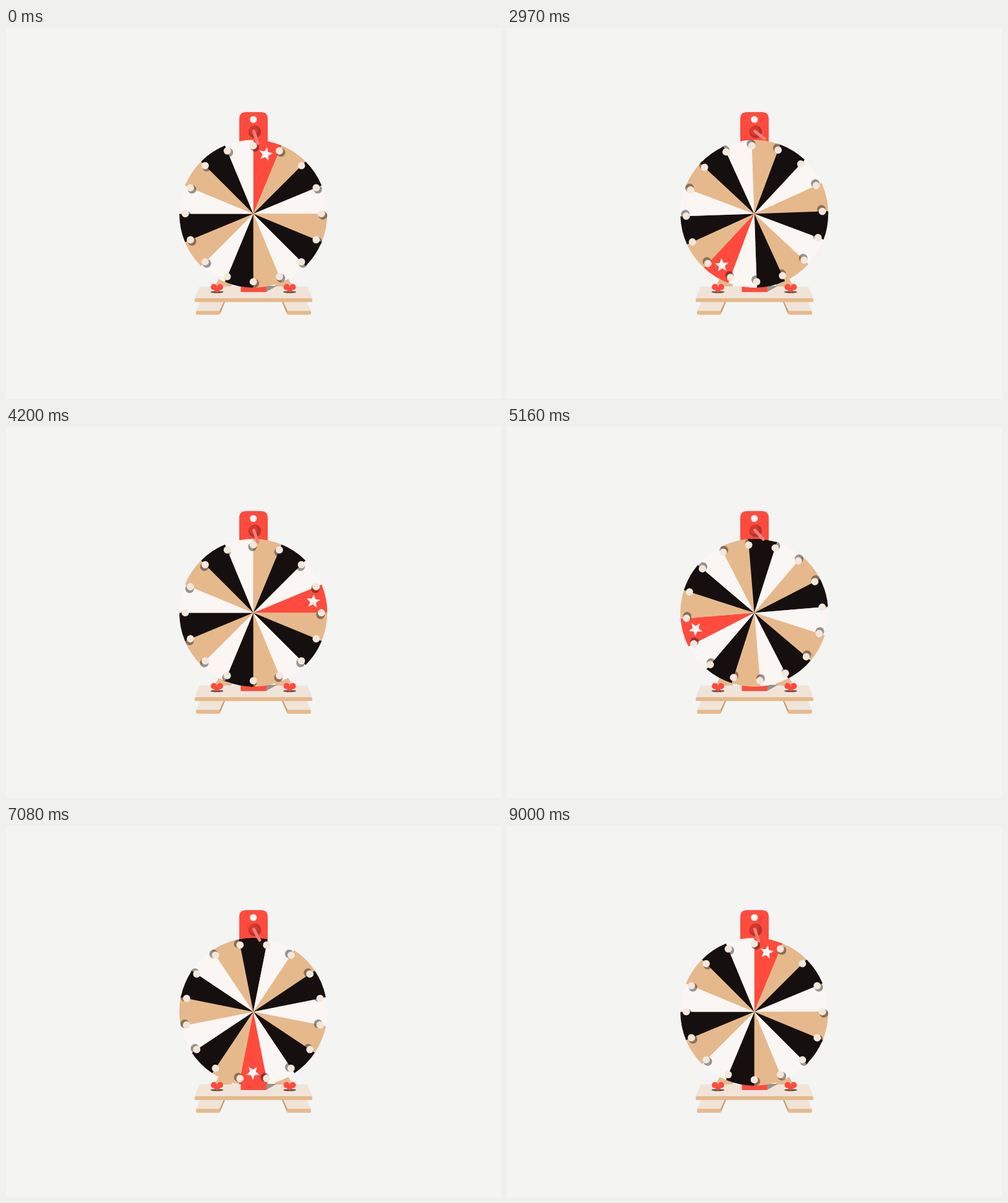
Animation, 800 px wide and 600 px high, one loop 9.6 s. Source, as an HTML page:

```html
<!DOCTYPE html>
<html lang="en">
<head>
<meta charset="utf-8">
<title>Prize wheel</title>
<style>
  html, body { margin: 0; width: 100%; height: 100%; overflow: hidden; background: #f4f4f3; }
  svg { display: block; width: 100vw; height: 100vh; }
  .red { fill: #ff4b3d; }
  .tan { fill: #e6b98c; }
  .cream { fill: #f0e4d8; }
  .edge { fill: #c99766; }
</style>
</head>
<body>
<svg viewBox="0 0 800 600">
  <defs>
    <g id="brace">
      <path class="tan" d="M337 418L348 398H375L364 418Z"/>
    </g>
    <g id="foot">
      <path class="edge" d="M354 443L346 462L344 458L349 443Z"/>
      <path class="cream" d="M314 443H352L345 458H307Z"/>
      <rect class="tan" x="307" y="457.5" width="39" height="6.3" rx="2"/>
    </g>
    <g id="nut">
      <ellipse cx="341" cy="427" rx="10.5" ry="1.7" fill="#66504a"/>
      <path class="red" d="M337 420H345V425.5Q341 428.500 337 425.500Z"/>
      <circle class="red" cx="336" cy="419" r="5"/>
      <circle class="red" cx="346" cy="419" r="5"/>
    </g>
  </defs>

  <use href="#foot"/>
  <use href="#foot" transform="matrix(-1 0 0 1 800 0)"/>
  <path class="cream" d="M313 418H487L495 437H305Z"/>
  <rect class="tan" x="305" y="437" width="190" height="6.2" rx="2"/>
  <use href="#brace"/>
  <use href="#brace" transform="matrix(-1 0 0 1 800 0)"/>
  <path d="M420 417H438L420 427Z" fill="#99928d"/>
  <path class="red" d="M377 200V147Q377 136 388 136H412Q423 136 423 147V200Z"/>
  <rect class="red" x="379.500" y="200" width="41" height="227"/>
  <circle cx="399.800" cy="148" r="5.600" fill="#faf6f4"/>
  <circle cx="402" cy="168" r="10.300" fill="#b5352b"/>
  <circle cx="399.800" cy="166" r="7.500" fill="#d8382d"/>

  <g id="wheel"></g>
  <use href="#nut"/>
  <use href="#nut" x="117.500"/>
  <line id="arm" x1="400.500" y1="167" x2="400.500" y2="187" stroke="#f57f77" stroke-width="5" stroke-linecap="round"/>
</svg>
<script>
const CX = 399.7, CY = 300.4, RADIUS = 119.5, STEP = 22.5;
const LOOP = 9600, SPIN = 9000, TICK = 30;
const wheel = document.getElementById('wheel');
const arm = document.getElementById('arm');

// Clockwise from the top, in degrees
function polar(angle, radius, x = CX, y = CY) {
  const a = angle * Math.PI / 180;
  return [x + radius * Math.sin(a), y - radius * Math.cos(a)];
}

function add(tag, attrs) {
  const node = document.createElementNS('http://www.w3.org/2000/svg', tag);
  for (const key in attrs) node.setAttribute(key, attrs[key]);
  wheel.append(node);
}

function buildWheel() {
  const colors = ['#faf6f4', '#e6b98c', '#15100f'];
  add('circle', { cx: CX, cy: CY, r: RADIUS - 0.5, fill: colors[1] });
  for (let i = 0; i < 16; i++) {
    const from = polar(i * STEP, RADIUS), to = polar((i + 1) * STEP, RADIUS);
    add('path', {
      d: `M${CX} ${CY}L${from}A${RADIUS} ${RADIUS} 0 0 1 ${to}Z`,
      fill: i ? colors[i % 3] : '#ff4b3d'
    });
  }
  const [sx, sy] = polar(11.7, 98.5);
  const star = Array.from({ length: 10 }, (_, i) => polar(11.25 + i * 36, i % 2 ? 5 : 11.5, sx, sy));
  add('polygon', { points: star.join(' '), fill: '#faf6f4' });
  for (let i = 0; i < 16; i++) {
    const [x, y] = polar(i * STEP, 110);
    add('circle', { cx: x + 2.5, cy: y + 2.5, r: 7, fill: '#15100f', 'fill-opacity': 0.43 });
    add('circle', { cx: x, cy: y, r: 5.9, fill: '#f3e7dc' });
  }
}

// Seconds, degrees, degrees per second
const spin = [
  [0, 0, 0], [2.1, 272, 266], [2.97, 560.5, 395], [4.2, 1147.5, 555],
  [5.16, 1682.8, 482], [7.08, 2328.75, 205], [9, 2520, 0]
];

function wheelAngle(t) {
  const i = Math.max(1, spin.findIndex(k => t <= k[0]));
  const [t0, a0, v0] = spin[i - 1], [t1, a1, v1] = spin[i];
  const d = t1 - t0, u = (t - t0) / d, w = 1 - u;
  return a0 * w * w * (1 + 2 * u) + a1 * u * u * (1 + 2 * w) + d * u * w * (v0 * w - v1 * u);
}

// Flapper swing across one peg interval: snaps back, then is pushed out
const swing = [[0, 18], [2, -3], [11.25, 28], [18, 44], [20.5, 52], [22.5, 18]];

function armAngle(angle) {
  const p = angle % STEP;
  const i = Math.max(1, swing.findIndex(k => p <= k[0]));
  const [p0, a0] = swing[i - 1], [p1, a1] = swing[i];
  return a0 + (a1 - a0) * (p - p0) / (p1 - p0);
}

function draw(now) {
  const ms = Math.min(SPIN, Math.floor(now % LOOP / TICK) * TICK);
  const angle = wheelAngle(ms / 1000);
  wheel.setAttribute('transform', `rotate(${angle} ${CX} ${CY})`);
  arm.setAttribute('transform', `rotate(${-armAngle(angle)} 400.5 167)`);
}

buildWheel();
draw(0);
let start;
requestAnimationFrame(function frame(now) {
  start ??= now;
  draw(Math.max(0, now - start));
  requestAnimationFrame(frame);
});
</script>
</body>
</html>
```
